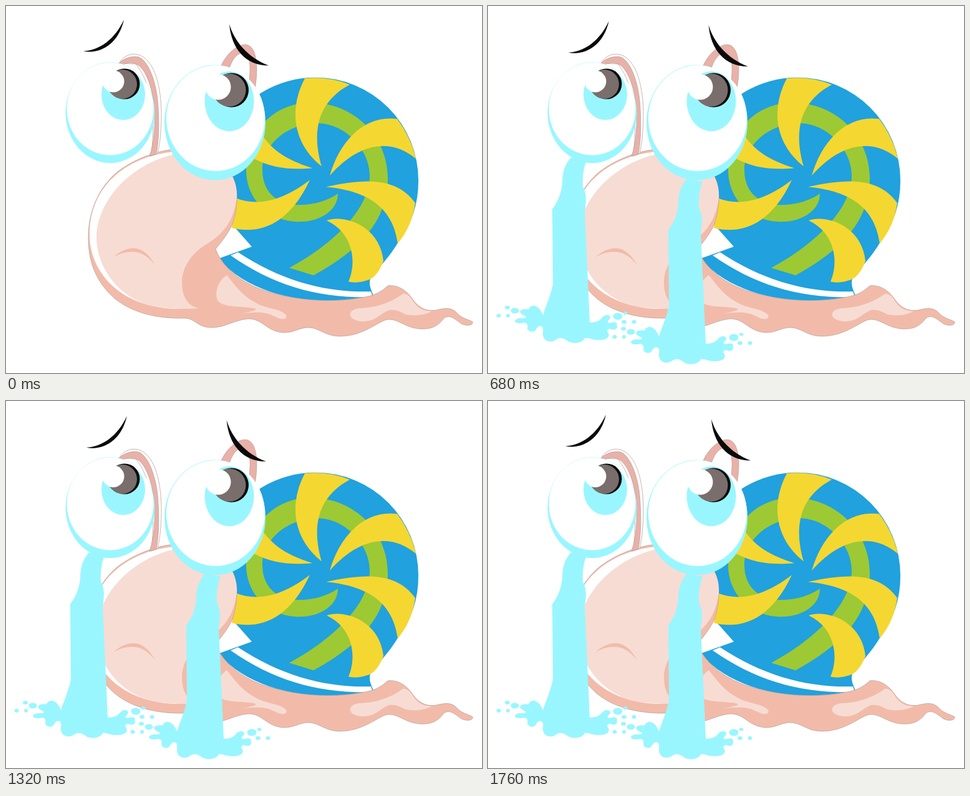
These frames come from a looping animation (763x589 px, 1920 ms). An HTML page with a canvas:

```html
<!DOCTYPE html>
<html lang="en">
<head>
<meta charset="utf-8">
<title>Crying snail</title>
<style>
html, body { margin: 0; width: 100%; height: 100%; overflow: hidden; background: #fff; }
canvas { display: block; }
</style>
</head>
<body>
<canvas id="stage" width="763" height="589"></canvas>
<script>
const ctx = document.getElementById('stage').getContext('2d');
const LOOP = 1920, STEP = 40;
const BLUE = '#21a1dd', YELLOW = '#f5d731', GREEN = '#9dc934', CYAN = '#99f6ff';
const SKIN = '#f7dcd4', SHADE = '#f2bba9', STALK = '#e9b1a8', EDGE = '#b9a39d', INK = '#0a0a0a';

function shape(d, fill, edge) {
  const p = new Path2D(d);
  ctx.fillStyle = fill;
  ctx.fill(p);
  if (edge) {
    ctx.strokeStyle = edge;
    ctx.lineWidth = 0.8;
    ctx.stroke(p);
  }
}

function oval(x, y, rx, ry, fill) {
  ctx.beginPath();
  ctx.ellipse(x, y, rx, ry, 0, 0, Math.PI * 2);
  ctx.fillStyle = fill;
  ctx.fill();
}

function shifted(x, y, draw) {
  ctx.save();
  ctx.translate(x, y);
  draw();
  ctx.restore();
}

function drawShell() {
  shape('M341 404L394 385L363 350L350 201A165 165 0 0 1 496 113.500A165 165 0 0 1 661 278.500' +
    'A165 165 0 0 1 628 379C612 406 590 426 584 437C581 445 585 454 589 463C530 482 400 476 341 404Z', BLUE);
  // spiral band
  shape('M454 419C500 395 584 335 583 270C583 230 544 187 500 187C450 187 411 222 411 262' +
    'C411 300 438 318 468 318C495 318 515 311 532 300C532 326 505 345 470 345' +
    'C425 345 385 312 385 262C385 200 430 154 488 154C560 154 612 210 612 275C612 344 566 391 493 431Z', GREEN);
  // blades
  [
    'M479 115C455 160 457 217 506 256C490 200 499 153 551 125C530 116 502 112 479 115Z',
    'M519 271C535 215 575 173 627 180C642 200 652 222 657 244C620 212 568 215 519 271Z',
    'M513 289C570 277 625 271 656 315C652 342 643 361 628 380C620 325 585 296 513 289Z',
    'M514 343C540 333 599 350 605 408C599 424 591 434 582 438C570 442 560 444 549 441C563 410 556 362 514 343Z',
    'M487 278C450 306 410 323 368 307L362 355C400 364 450 357 487 278Z',
    'M410 205C432 238 462 249 491 259C455 262 428 259 398 244Z'
  ].forEach(d => shape(d, YELLOW));
  shape('M360 399L372 394C440 439 510 459 585 457L588 466C500 468 430 448 360 399Z', '#fff');
}

function drawBody() {
  shape('M336 390C345 415 370 440 410 455C460 473 520 477 570 468C590 465 600 460 612 449' +
    'C628 447 641 456 650 468C660 483 672 491 690 488C702 485 714 483 722 492C731 502 740 502 748 507' +
    'C749 513 738 514 730 510C718 501 711 495 702 501C690 517 678 519 662 518C638 516 626 499 608 504' +
    'C592 510 570 530 535 530C510 530 502 515 482 516C466 518 460 525 443 524' +
    'C416 521 412 502 388 502C365 504 350 517 327 516C307 515 303 502 288 501C245 502 205 494 175 470' +
    'C145 444 132 412 132 372C132 322 154 286 180 265C206 246 236 234 268 230L330 225L362 272' +
    'C373 294 372 322 363 350C356 366 344 380 336 390Z', SHADE, EDGE);
  shape('M268 234C198 241 134 285 134 367C134 425 180 482 270 486L308 485L252 483L250 300Z', '#fff');
  shape('M270 238C205 252 146 308 145 372C146 427 190 479 252 484C280 487 298 486 308 485' +
    'C290 481 282 464 282 444C282 417 300 394 325 380C351 363 365 343 370 308C371 291 366 279 362 272L320 225Z', SKIN);
  shape('M172 403C195 383 221 381 239 416C222 393 200 388 172 403Z', SHADE);
  shape('M354 432C340 441 334 459 339 472C345 483 370 482 390 484C409 486 401 489 376 494' +
    'C400 491 415 490 430 498C440 504 452 504 449 496C440 485 415 486 400 476C380 466 368 450 354 432Z', SKIN);
  shape('M636 462C618 476 590 485 566 485C546 488 547 503 568 506C592 508 600 493 614 488' +
    'C626 487 632 491 640 495C655 498 672 496 682 490C665 489 657 482 650 470C646 464 640 461 636 462Z', SKIN);
}

function drawBackStalk() {
  shape('M344 98C352 78 370 62 383 62C400 62 404 90 401 118L399 134L390 120' +
    'C392 100 393 77 379 75C368 77 362 88 358 100Z', STALK, EDGE);
}

function drawFrontStalk() {
  shape('M181 92C188 80 200 75 212 78C235 85 248 120 249 170C249 200 247 220 243 237L232 241' +
    'C239 200 239 130 208 93Z', '#fff', EDGE);
  shape('M181 92C190 82 205 80 213 82C231 90 243 130 244 165C246 200 244 220 241 238L230 241' +
    'C238 220 239 190 238 165C235 130 223 98 208 93C198 89 190 92 184 96Z', STALK, EDGE);
}

function drawEyes() {
  oval(167, 171, 71.5, 81, CYAN);
  oval(167, 165, 69.5, 74.5, '#fff');
  oval(188, 142, 35, 41, CYAN);
  oval(190, 125, 24.5, 24.5, INK);
  oval(186.5, 125.5, 23.5, 23.5, '#796e6c');
  oval(172, 121, 17.5, 17.5, '#fff');

  oval(335, 187, 81, 92.5, CYAN);
  oval(336, 180, 79, 85, '#fff');
  oval(358, 153, 39.5, 48, CYAN);
  oval(361.5, 135, 27.5, 27.5, INK);
  oval(358, 135, 26.5, 26.5, '#796e6c');
  oval(340, 130, 20.5, 20.5, '#fff');
}

const STREAM_TOP = 'M130 238L173 238C165 255 162 275 160 290C158 305 161 315 160 335';
const STREAM_BACK = 'C118 320 122 300 122 285C127 270 124 255 130 238Z';

const tearStages = {
  none() {},
  short() {
    shape(STREAM_TOP + 'C150 345 140 336 132 343C124 349 116 344 110 335' + STREAM_BACK, CYAN);
  },
  long() {
    shape(STREAM_TOP + 'C157 345 159 355 159 370C160 390 157 405 156 420C152 430 154 440 152 448' +
      'C145 446 140 450 132 447C122 452 114 454 103 454C103 440 97 425 101 415' +
      'C104 403 108 390 107 375C105 355 105 345 110 335' + STREAM_BACK, CYAN);
  },
  splash() {
    shape('M133 243C122 255 119 270 119 285C117 305 109 318 103 326L104 446C102 460 92 485 88 496' +
      'C81 478 68 478 65 487C54 485 46 490 56 496C64 499 62 502 52 501C40 502 40 510 54 509' +
      'C64 506 64 513 63 518C66 525 76 524 78 517C84 510 90 514 88 524C87 537 98 541 107 537' +
      'C116 529 123 534 130 539C140 543 152 540 155 533C162 532 166 536 175 536' +
      'C190 537 196 531 193 525C188 518 195 518 203 517C210 512 207 506 199 508' +
      'C190 510 190 507 196 501C196 494 187 495 183 500C178 507 170 508 163 508' +
      'L160 440L155 330C158 310 158 302 152 290C151 275 153 260 158 248Z', CYAN);
    [
      [17, 497, 3.5, 3], [31, 484, 4, 3], [32, 497, 3, 3], [43, 489, 6.5, 4.5],
      [201, 515, 6, 4.5], [208, 498, 7.5, 5.5], [220, 493, 3.5, 2.5], [218, 507, 4, 3], [234, 507, 3.5, 3]
    ].forEach(([x, y, rx, ry]) => oval(x, y, rx, ry, CYAN));
  }
};

// Tears repeat every 640 ms; only the first moment of the loop is dry.
function tearAt(t) {
  if (t < 80) return tearStages.none;
  const phase = (t - 80) % 640;
  if (phase < 80) return tearStages.short;
  return phase < 240 ? tearStages.long : tearStages.splash;
}

// Frown amount at every 160 ms, linear in between.
const FROWN = [0, 0, 1, 1, 0, 1, 1, 0, 0, 1, 1, 0, 0];

function frownAt(t) {
  const i = Math.floor(t / 160);
  return FROWN[i] + (FROWN[i + 1] - FROWN[i]) * (t / 160 - i);
}

function drawBrows(k) {
  shifted(19 * k, 9 * k, () =>
    shape('M124 72.500C150 71 174 54 189 22C181 59 153 78 124 72.500Z', INK));
  shifted(-17.5 * k, 6 * k, () =>
    shape('M358 29C366 57 388 83 421 95.500C385 96 361 69 358 29Z', INK));
}

function draw(now) {
  const t = Math.floor((now % LOOP) / STEP) * STEP;
  const tear = tearAt(t);
  ctx.fillStyle = '#fff';
  ctx.fillRect(0, 0, 763, 589);
  drawBackStalk();
  shifted(0, 1.2, drawShell);
  drawBody();
  drawFrontStalk();
  tear();
  shifted(186, 34, tear);
  drawEyes();
  drawBrows(frownAt(t));
  requestAnimationFrame(draw);
}

draw(0);
</script>
</body>
</html>
```
